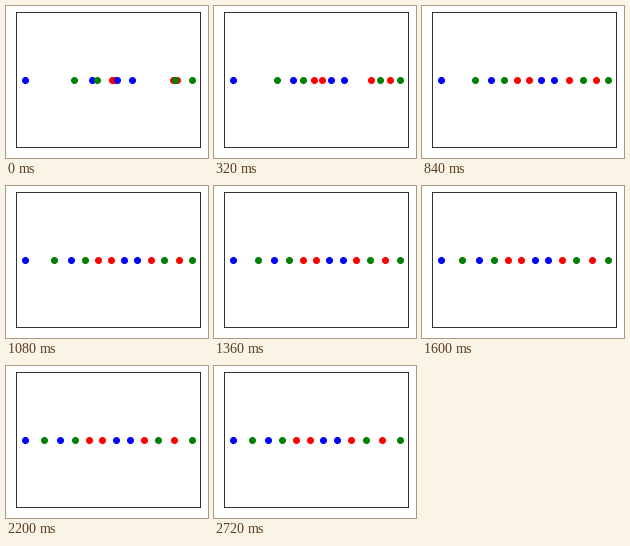
A matplotlib script that plays this animation: 202 px wide and 152 px high, repeating every 2.76 s.

```python
import numpy as np
import matplotlib.pyplot as plt
from matplotlib.animation import FuncAnimation

W, H, DPI = 202, 152, 72
FRAMES, STEP = 69, 40
LEFT, RIGHT, TOP, BOTTOM = 10, 194, 6, 141
ROW = 74

START = [19, 67.6, 86, 91, 106.4, 107.9, 111, 126, 167, 169.3, 171.4, 186]
COLORS = np.array(list("bgbgrrbbrgrg"))
LAYERS = {"r": "red", "b": "blue", "g": "green"}  # back to front

CENTER = (START[0] + START[-1]) / 2
PULL = 0.00215   # strength of the spring towards the center
RATE = 35        # distance moved per unit of force
PACE = 1.42      # limit on the joint movement per frame
SUBSTEPS = 8


def force(x):
    """Every pair repels with 1/d, a weak spring pulls to the center."""
    gap = x[:, None] - x
    np.fill_diagonal(gap, np.inf)
    total = (1 / gap).sum(axis=1) + PULL * (CENTER - x)
    total[[0, -1]] = 0  # the outer dots are fixed
    return total


def advance(x, frame):
    limit = PACE * (1 + np.exp(-frame / 6)) / SUBSTEPS
    for _ in range(SUBSTEPS):
        move = RATE / SUBSTEPS * force(x)
        x = x + move * min(1, limit / np.linalg.norm(move))
    return x


track = [np.array(START, dtype=float)]
for i in range(FRAMES - 1):
    track.append(advance(track[-1], i))

fig = plt.figure(figsize=(W / DPI, H / DPI), dpi=DPI, facecolor="white")
ax = fig.add_axes([LEFT / W, 1 - BOTTOM / H, (RIGHT - LEFT) / W, (BOTTOM - TOP) / H])
ax.set(xlim=(LEFT, RIGHT), ylim=(BOTTOM, TOP), xticks=[], yticks=[])
layers = {key: ax.plot([], [], "o", color=color, markersize=6)[0]
          for key, color in LAYERS.items()}


def update(frame):
    for key, dots in layers.items():
        x = track[frame][COLORS == key]
        dots.set_data(x, np.full(len(x), ROW))
    return list(layers.values())


anim = FuncAnimation(fig, update, frames=FRAMES, interval=STEP, repeat=True,
                     repeat_delay=0)
plt.show()
```
